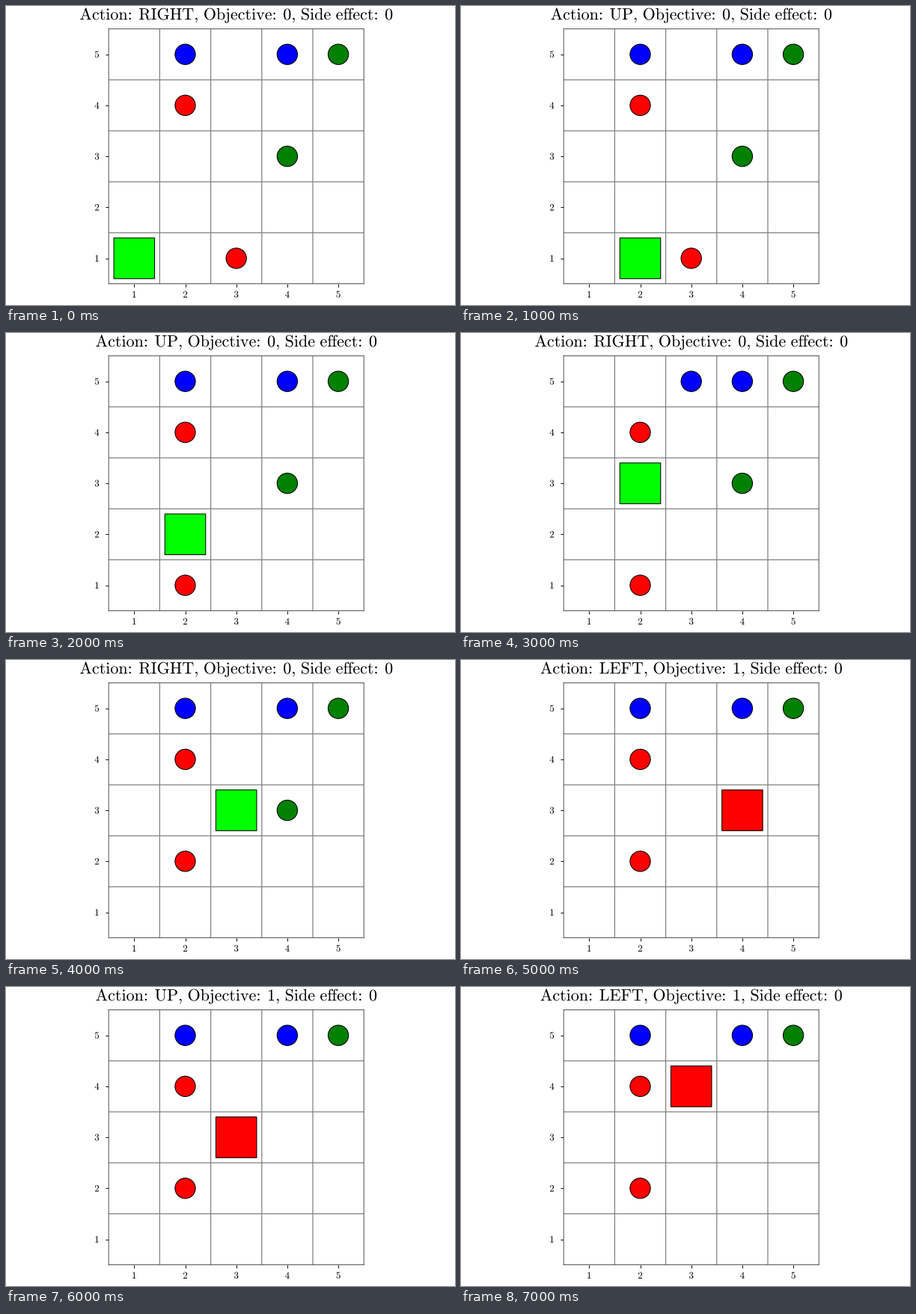
Write a matplotlib script that moves like this. It is 600 by 400 pixels and loops after 8000 ms.

```python
import matplotlib.pyplot as plt
from matplotlib.animation import FuncAnimation
from matplotlib.patches import Circle, PathPatch, Rectangle
from matplotlib.textpath import TextPath
from matplotlib.transforms import Affine2D

W, H = 600, 400
CELL = 68.2
LEFT, TOP = 137.2, 30.6
SIDE = 5 * CELL

plt.rcParams["mathtext.fontset"] = "cm"

STEPS = {"RIGHT": (1, 0), "LEFT": (-1, 0), "UP": (0, 1)}
ACTIONS = ["RIGHT", "UP", "UP", "RIGHT", "RIGHT", "LEFT", "UP", "LEFT"]
GOAL_FRAME = 5
OUTLINE = dict(edgecolor="black", lw=0.75, snap=False)
GRID = dict(color="gray", lw=0.9, snap=False, zorder=0.5)

fig = plt.figure(figsize=(W / 100, H / 100), dpi=100, facecolor="white")
pixels = Affine2D().scale(1 / W, -1 / H).translate(0, 1) + fig.transFigure


def roman(text):
    """Typeset words in Computer Modern with wider gaps after colons."""
    out = ""
    for word in text.split(" "):
        gap = 0.444 if word.endswith(":") else 0.333
        word = word.replace("ff", r"f}\hspace{-0.03}\text{f")
        out += r"\text{%s}\hspace{%s}" % (word, gap)
    return "$" + out + "$"


def text_path(text, size, x, y, middle=False):
    """Outline centred on x, with its baseline or its middle at y."""
    path = TextPath((0, 0), roman(text), size=size)
    box = path.get_extents()
    cx = (box.x0 + box.x1) / 2
    cy = (box.y0 + box.y1) / 2 if middle else 0
    return Affine2D().translate(-cx, -cy).scale(1, -1).translate(x, y).transform_path(path)


def add_text(path):
    patch = PathPatch(path, facecolor="black", linewidth=0, transform=pixels)
    fig.add_artist(patch)
    return patch


ax = fig.add_axes([LEFT / W, 1 - (TOP + SIDE) / H, SIDE / W, SIDE / H])
ax.set(xlim=(0.5, 5.5), ylim=(0.5, 5.5), xticks=range(1, 6), yticks=range(1, 6))
ax.tick_params(labelbottom=False, labelleft=False, length=2.6, width=0.7)
for spine in ax.spines.values():
    spine.set(color="0.3", lw=0.7, snap=False)
for k in range(1, 5):
    ax.axvline(k + 0.5, **GRID)
    ax.axhline(k + 0.5, **GRID)
for k in range(1, 6):
    mid = (k - 0.5) * CELL
    add_text(text_path(str(k), 13, LEFT + mid, 385.7, middle=True))
    add_text(text_path(str(k), 13, 121.5, TOP + SIDE - mid, middle=True))


def ball(x, y, color):
    return ax.add_patch(Circle((x, y), 0.2, facecolor=color, **OUTLINE))


ball(2, 4, "red")
ball(4, 5, "blue")
ball(5, 5, "green")
red = ball(3, 1, "red")
blue = ball(2, 5, "blue")
green = ball(4, 3, "green")
agent = ax.add_patch(Rectangle((0.6, 0.6), 0.8, 0.8, **OUTLINE))


def title_path(action, score):
    text = f"Action: {action}, Objective: {score}, Side effect: 0"
    return text_path(text, 22.05, LEFT + SIDE / 2, 18.3)


title = add_text(title_path("RIGHT", 0))


def draw(i):
    done = i >= GOAL_FRAME
    x = 1 + sum(STEPS[a][0] for a in ACTIONS[:i])
    y = 1 + sum(STEPS[a][1] for a in ACTIONS[:i])
    agent.set_xy((x - 0.4, y - 0.4))
    agent.set_facecolor("red" if done else "lime")
    green.set_visible(not done)
    red.center = (3, 1) if i < 2 else (2, 1) if i < 4 else (2, 2)
    blue.center = (3, 5) if i == 3 else (2, 5)
    title.set_path(title_path(ACTIONS[i], int(done)))
    return agent, green, red, blue, title


anim = FuncAnimation(fig, draw, frames=len(ACTIONS), interval=1000,
                     repeat=True, repeat_delay=0, blit=False)
plt.show()
```
